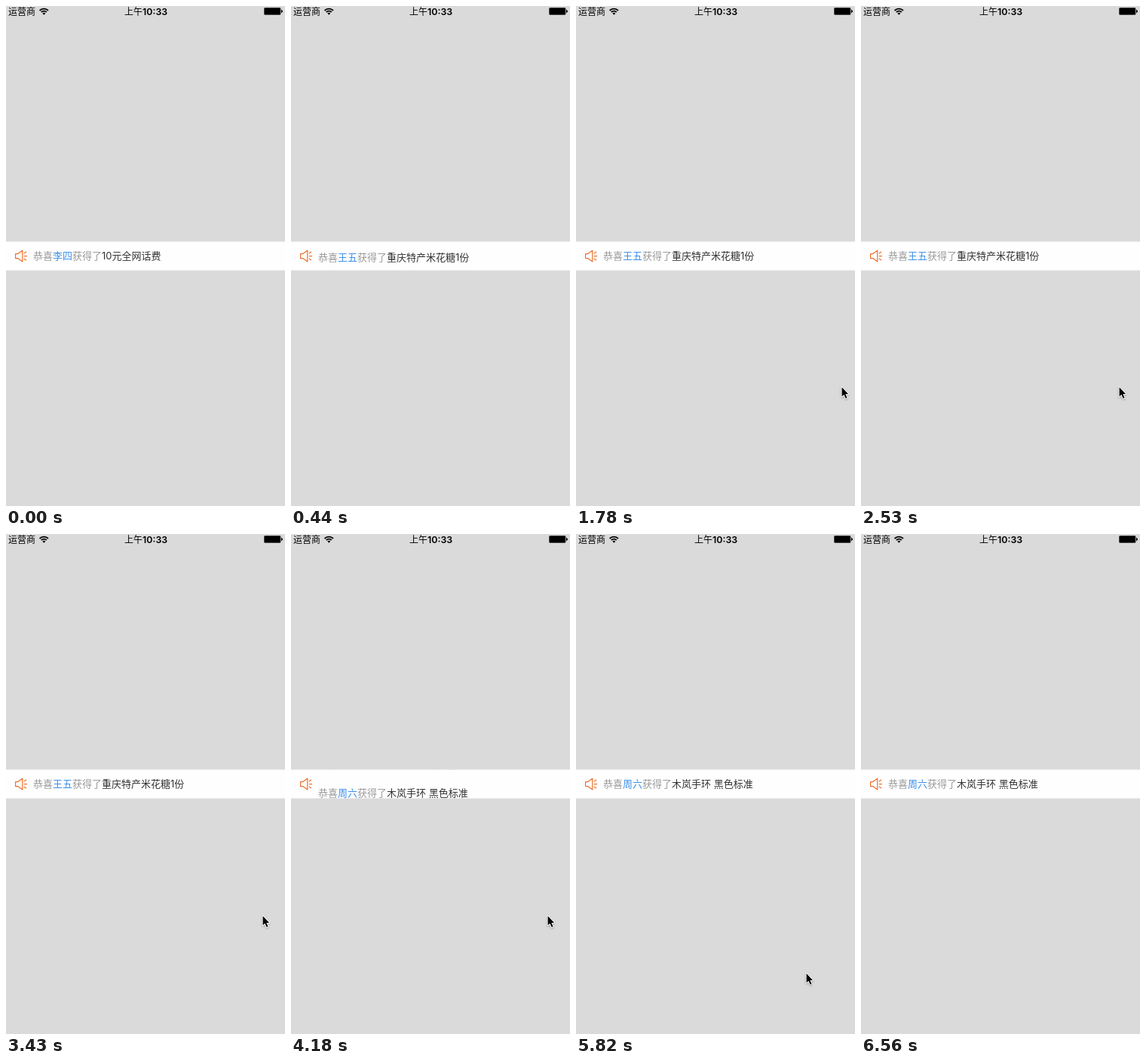
These frames come from a looping animation (370 px wide and 661 px high, 8 s). An HTML page:

```html
<!DOCTYPE html>
<html lang="zh-CN">
<head>
<meta charset="utf-8">
<title>中奖播报</title>
<style>
  html, body { margin: 0; width: 100%; height: 100%; overflow: hidden; background: #dadada; }
  svg { display: block; }
  text { font-family: Inter, "Noto Sans CJK SC", "Noto Sans CJK", sans-serif; white-space: pre; }
  .status { font-size: 12px; }
  .clock { font-size: 12.4px; font-weight: 600; }
  .message { font-size: 13px; fill: #999; }
  .winner { fill: #3b8fea; }
  .prize { fill: #333; }
  .line { fill: none; stroke-linecap: round; stroke-linejoin: round; }
</style>
</head>
<body>
<svg width="370" height="661" viewBox="0 0 370 661">
  <rect width="370" height="661" fill="#dadada"/>

  <text class="status" x="3" y="12">运营商</text>
  <g fill="none" stroke="#000" stroke-width="1.8">
    <path d="M44.6 6a8 8 0 0 1 11.4 0"/>
    <path d="M46.8 8.2a5 5 0 0 1 7 0"/>
  </g>
  <path d="M50.3 11.7l-2-2a2.8 2.8 0 0 1 4 0z"/>
  <text class="status" x="157" y="12">上午<tspan class="clock">10:33</tspan></text>
  <rect x="342.5" y="2.5" width="21.5" height="9" rx="1" stroke="#444"/>
  <path d="M365.4 5.2a2 2 0 0 1 0 3.6z" stroke="#000" stroke-width=".8"/>

  <rect y="311.5" width="370" height="38" fill="#fefefe"/>
  <g class="line" stroke="#ee702c" stroke-width="1.2">
    <path d="M12.6 327.6h3.2l6-4.4v14.8l-6-4.4h-3.2z"/>
    <path d="M24.3 326.8l2.3-1.6M24.3 330.6h3.3M24.3 334.2l2.3 1.6"/>
  </g>
  <svg y="311" width="370" height="39" overflow="hidden"><g id="messages"></g></svg>

  <g id="cursor" style="filter:drop-shadow(0 1px 1px rgba(0,0,0,.3))">
    <path d="M.6 1v12.2l2.8-2.5 2.3 5.1 1.9-.8-2.2-5.1h3.7z" stroke="#fff" stroke-width="2" paint-order="stroke" stroke-linejoin="round"/>
  </g>
</svg>
<script>
const LOOP = 8000, TICK = 149, TICK_LEAD = 12;
const ROW = 38, FIRST_SCROLL = 15, SCROLL_PERIOD = 3840, SCROLL_TIME = 500;
const CURSOR_SHOWN = 880;
const messages = document.getElementById('messages');
const cursor = document.getElementById('cursor');

const winners = [
  ['李四', '10元全网话费'],
  ['王五', '重庆特产米花糖1份'],
  ['周六', '木岚手环 黑色标准']
];
messages.innerHTML = winners.map(([name, prize], i) =>
  `<text class="message" x="36" y="${24 + i * ROW}">恭喜<tspan class="winner">${name}</tspan>获得了<tspan class="prize">${prize}</tspan></text>`
).join('');

const entry = { x: 358, y: 513 };
const glides = [
  { start: 890, time: 890, x: 352, y: 503 },
  { start: 1930, time: 600, x: 342, y: 503 },
  { start: 3280, time: 100, x: 340, y: 504 },
  { start: 5230, time: 440, x: 298, y: 591 },
  { start: 5670, time: 150, x: 305, y: 580 },
  { start: 5820, time: 150, x: 303, y: 575 },
  { start: 6120, time: 440, x: 316, y: 680 }
];

// Eased progress from 0 to 1 of a move that begins at start.
function progress(now, start, time) {
  const p = Math.min(1, Math.max(0, (now - start) / time));
  return p * p * (3 - 2 * p);
}

function scrollAt(now) {
  let rows = 0;
  for (let i = 0; i < winners.length - 1; i++) {
    rows += progress(now, FIRST_SCROLL + i * SCROLL_PERIOD, SCROLL_TIME);
  }
  return Math.round(rows * ROW);
}

function cursorAt(now) {
  let { x, y } = entry;
  for (const glide of glides) {
    const p = progress(now, glide.start, glide.time);
    x += (glide.x - x) * p;
    y += (glide.y - y) * p;
  }
  return `${Math.round(x)} ${Math.round(y)}`;
}

// The picture advances in coarse ticks rather than continuously.
function draw() {
  const elapsed = performance.now() % LOOP;
  const now = Math.floor((elapsed + TICK_LEAD) / TICK) * TICK;
  messages.setAttribute('transform', `translate(0 ${-scrollAt(now)})`);
  cursor.setAttribute('transform', `translate(${cursorAt(now)})`);
  cursor.setAttribute('visibility', now < CURSOR_SHOWN ? 'hidden' : 'visible');
  requestAnimationFrame(draw);
}
draw();
</script>
</body>
</html>
```
